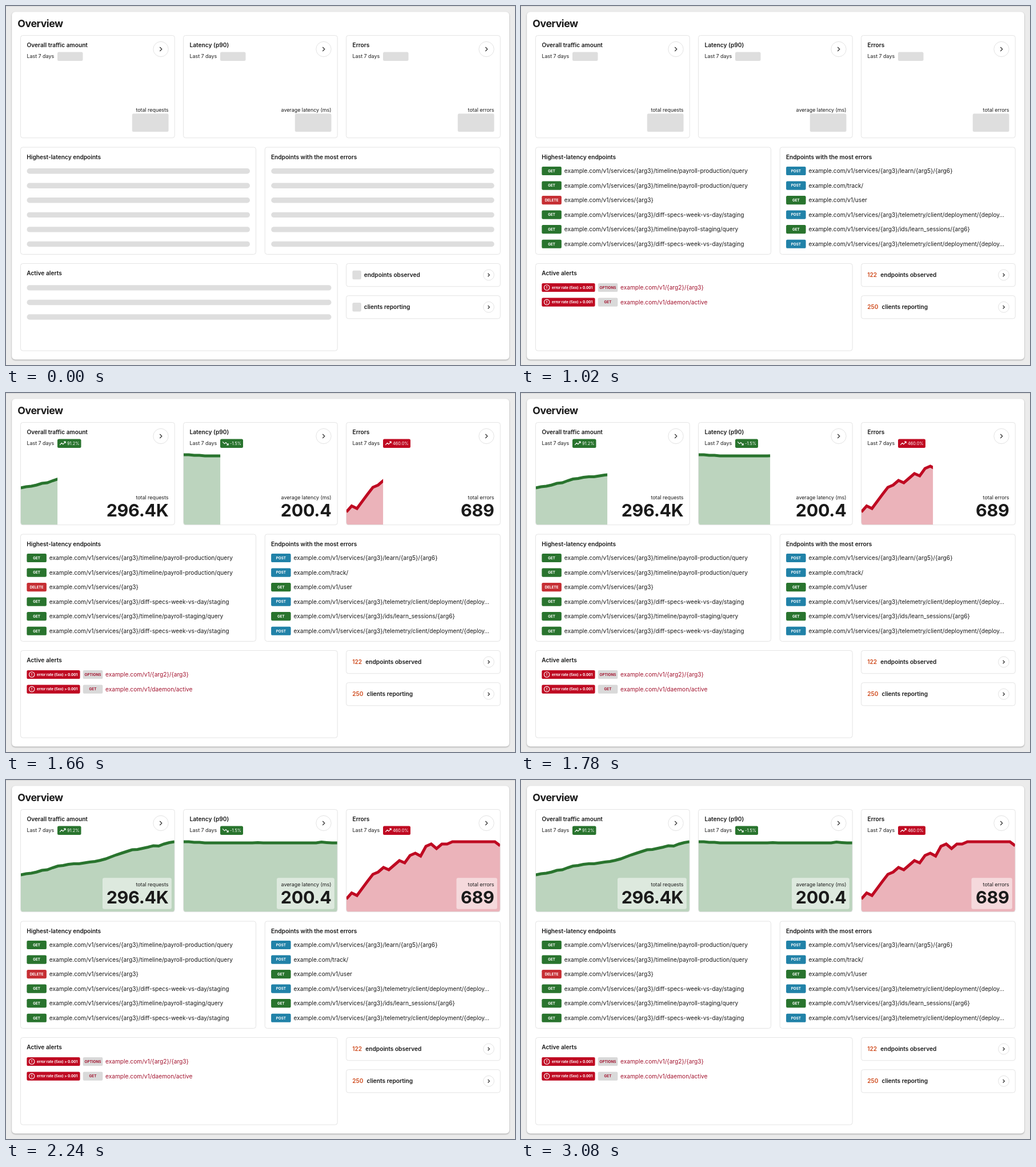
Write an HTML page that moves like this. It is 891 px wide and 628 px high and loops after 3.1 s.

```html
<!DOCTYPE html>
<html lang="en">
<head>
<meta charset="utf-8">
<title>Overview</title>
<style>
  html, body { margin: 0; width: 100%; height: 100%; overflow: hidden; background: #ebebeb; }
  svg { display: block; width: 891px; height: 628px; font-family: Inter, sans-serif; }
  text { fill: #1a1a1a; }
  .h1 { font-size: 17.78px; font-weight: 700; letter-spacing: -.025em; }
  .title { font-size: 10.16px; font-weight: 600; }
  .body { font-size: 10.16px; }
  .small { font-size: 8.89px; }
  .big { font-size: 30.5px; font-weight: 700; letter-spacing: -.01em; }
  .tag { font-size: 6.35px; font-weight: 700; }
  .pill { font-size: 7.3px; }
</style>
</head>
<body>
<svg id="stage" viewBox="0 0 891 628"></svg>
<script>
const LOOP = 3100;
const AT = { alerts: 240, tables: 800, totals: 1380, line: 3000 };
const SWEEP = { start: 1405, length: 786, width: 269.5 };
const GREEN = '#29742e', RED = '#bf0a22', BLUE = '#2182a8', ORANGE = '#cf4a1c';
const BONE = '#dedede', LINK = '#a3142f';
const METHOD = { GET: GREEN, POST: BLUE, DELETE: '#c62f34' };

const stage = document.getElementById('stage');
const timed = [], sweeps = [];

function add(parent, name, attrs, text) {
  const el = document.createElementNS('http://www.w3.org/2000/svg', name);
  for (const key in attrs) el.setAttribute(key, attrs[key]);
  if (text) el.textContent = text;
  return parent.appendChild(el);
}

function group(from, to) {
  const el = add(stage, 'g', {});
  timed.push({ el, from, to });
  return el;
}

const box = (g, x, y, width, height, rx, fill, more) =>
  add(g, 'rect', { x, y, width, height, rx, fill, ...more });
const label = (g, cls, x, y, text, more) => add(g, 'text', { class: cls, x, y, ...more }, text);
const stroke = (g, d, color, width) =>
  add(g, 'path', { d, fill: 'none', stroke: color, 'stroke-width': width });
const frame = (x, y, w, h) =>
  box(stage, x, y, w, h, 4, 'none', { stroke: '#e4e4e4', 'stroke-width': 1 });

function chevron(x, y, r) {
  const s = r > 10 ? 3.5 : 2.8;
  add(stage, 'circle', { cx: x, cy: y, r, fill: '#fff', stroke: '#dfdfdf', 'stroke-width': .9 });
  stroke(stage, `M${x - s / 2} ${y - s}l${s} ${s}l${-s} ${s}`, '#333', 1.25);
}

function tag(g, x, y, text, fill, color = '#fff') {
  box(g, x, y - 7.6, 34.5, 15.2, 2.2, fill);
  label(g, 'tag', x + 17.25, y + 2.3, text, { 'text-anchor': 'middle', style: `fill:${color}` });
}

// Panel
box(stage, 0, 0, 891, 628, 0, '#ebebeb');
box(group(0, AT.line), 0, 0, 891, 1, 0, '#d6d6d6');
box(stage, 10.2, 10.2, 870.8, 608.3, 6, '#fff', { style: 'filter:drop-shadow(0 1px 1px rgba(0,0,0,.32))' });
label(stage, 'h1', 20.3, 37, 'Overview');

const skeleton = group(0, AT.totals);
const totals = group(AT.totals, LOOP);

// Summary cards
const rise = 'M0 6.5l3.3-3.5l2.3 2.3l4.2-4.3M6.9 .8h3v3';
const fall = 'M0 1l3.3 3.5l2.3-2.3l4.2 4.3M6.9 6.7h3v-3';
const flat = Array(30).fill(110);
[108, 108, 109, 109].forEach((y, i) => flat[i] = y);
flat[14] = 109.5;
flat[26] = 108.6;
flat[27] = 109.4;

const cards = [
  { x: 25.5, title: 'Overall traffic amount', unit: 'total requests', total: '296.4K', boxX: 169,
    change: '91.2%', pillW: 41.5, icon: rise, color: GREEN,
    ys: [166, 164, 163, 161, 158, 157, 153.5, 150.5, 149.5, 147.5, 146.5, 146.5, 145, 143.5, 142.5,
      140.5, 138, 134.5, 131, 128, 125, 122, 121.5, 119.5, 117.5, 115, 115.5, 112, 109.5, 108] },
  { x: 310.5, title: 'Latency (p90)', unit: 'average latency (ms)', total: '200.4', boxX: 474,
    change: '-1.5%', pillW: 40, icon: fall, color: GREEN, ys: flat },
  { x: 595.5, title: 'Errors', unit: 'total errors', total: '689', boxX: 788.5,
    change: '460.0%', pillW: 48, icon: rise, color: RED,
    ys: [208, 197.5, 202, 189.5, 177, 165, 161, 153, 157, 149, 141, 145, 132, 128, 133,
      116, 112, 120, 112, 112, ...Array(9).fill(108), 115] }
];

const defs = add(stage, 'defs', {});

function chart(card, i) {
  const clip = add(defs, 'clipPath', { id: 'sweep' + i });
  sweeps.push(box(clip, card.x, 90, 0, 150, 0, '#000'));
  const round = add(defs, 'clipPath', { id: 'card' + i });
  box(round, card.x, 51.5, 269.7, 179.2, 4, '#000');

  const outer = add(totals, 'g', { 'clip-path': `url(#card${i})` });
  const g = add(outer, 'g', { 'clip-path': `url(#sweep${i})` });
  const pts = card.ys.map((y, n) => `${(card.x + .3 + n * 9.285).toFixed(2)} ${y}`).join('L');
  add(g, 'path', { d: `M${pts}V231H${card.x}Z`, fill: card.color, 'fill-opacity': .31 });
  stroke(g, 'M' + pts, card.color, 5);
}

cards.forEach((card, i) => {
  const { x } = card, left = x + 11, right = x + 259;
  const end = { 'text-anchor': 'end' };
  chart(card, i);
  frame(x, 51.5, 269.7, 179.2);
  label(stage, 'title', left, 72.4, card.title);
  label(stage, 'small', left, 91.4, 'Last 7 days');
  chevron(x + 245.5, 75.5, 13.2);

  box(skeleton, x + 64.5, 80.5, 44.5, 15.4, 2.5, BONE);
  box(skeleton, x + 195.3, 188.3, 63.7, 31.8, 2.5, BONE);
  label(skeleton, 'small', right, 185, card.unit, end);

  box(totals, x + 64.5, 80.5, card.pillW, 15.4, 2.5, card.color);
  stroke(add(totals, 'g', { transform: `translate(${x + 68.7} 84.3)` }), card.icon, '#fff', 1.1);
  label(totals, 'pill', x + 81.6, 90.9, card.change, { style: 'fill:#fff' });
  box(totals, card.boxX, 171.3, x + 264.3 - card.boxX, 54.5, 3, '#fff', { 'fill-opacity': .5 });
  label(totals, 'small', right, 186.3, card.unit, end);
  label(totals, 'big', right, 216.3, card.total, end);
});

// Endpoint tables
const svc = 'services/{arg3}';
const tables = [
  { x: 25.5, title: 'Highest-latency endpoints', rows: [
    ['GET', `v1/${svc}/timeline/payroll-production/query`],
    ['GET', `v1/${svc}/timeline/payroll-production/query`],
    ['DELETE', `v1/${svc}`],
    ['GET', `v1/${svc}/diff-specs-week-vs-day/staging`],
    ['GET', `v1/${svc}/timeline/payroll-staging/query`],
    ['GET', `v1/${svc}/diff-specs-week-vs-day/staging`]] },
  { x: 453.2, title: 'Endpoints with the most errors', rows: [
    ['POST', `v1/${svc}/learn/{arg5}/{arg6}`],
    ['POST', 'track/'],
    ['GET', 'v1/user'],
    ['POST', `v1/${svc}/telemetry/client/deployment/{deploy…`],
    ['GET', `v1/${svc}/ids/learn_sessions/{arg6}`],
    ['POST', `v1/${svc}/telemetry/client/deployment/{deploy…`]] }
];
const bones = group(0, AT.tables);
const filled = group(AT.tables, LOOP);

for (const { x, title, rows } of tables) {
  frame(x, 247, 412, 187.4);
  label(stage, 'title', x + 10.7, 267.5, title);
  rows.forEach(([method, path], i) => {
    const y = 288.5 + i * 25.55;
    box(bones, x + 11, y - 4.5, 390.5, 9.4, 4.7, BONE);
    tag(filled, x + 10.9, y, method, METHOD[method]);
    label(filled, 'body', x + 50.3, y + 3.6, 'example.com/' + path);
  });
}

// Alerts
frame(25.5, 450.5, 554.7, 152.6);
label(stage, 'title', 36.2, 471.4, 'Active alerts');
const waiting = group(0, AT.alerts);
const alerts = group(AT.alerts, LOOP);
for (let i = 0; i < 3; i++) box(waiting, 36.5, 488.2 + i * 25.55, 533, 9.4, 4.7, BONE);

[['OPTIONS', 'v1/{arg2}/{arg3}'], ['GET', 'v1/daemon/active']].forEach(([method, path], i) => {
  const y = 492.5 + i * 25.55;
  box(alerts, 36.4, y - 7.6, 93.2, 15.2, 2.2, RED);
  add(alerts, 'circle', { cx: 45.2, cy: y, r: 4.7, fill: 'none', stroke: '#fff', 'stroke-width': 1.1 });
  stroke(alerts, `M45.2 ${y - 2.6}v3.1m0 1v1.1`, '#fff', 1.1);
  label(alerts, 'tag', 54, y + 2.3, 'error rate (5xx) > 0.001', { style: 'fill:#fff' });
  tag(alerts, 134.8, y, method, '#d9d9d9', LINK);
  label(alerts, 'body', 174, y + 3.6, 'example.com/' + path, { style: `fill:${LINK}` });
});

// Counters
function counter(y, count, text, textX, at) {
  const before = group(0, at), after = group(at, LOOP);
  frame(595.5, y - 20, 269.7, 40.2);
  chevron(845, y, 9.4);
  box(before, 606.4, y - 7.7, 15.4, 15.4, 2.5, BONE);
  label(before, 'title', 626.8, y + 3.7, text);
  label(after, 'title', 606.2, y + 3.7, count, { style: `fill:${ORANGE}` });
  label(after, 'title', textX, y + 3.7, text);
}
counter(470.5, '122', 'endpoints observed', 629.3, AT.alerts);
counter(526.7, '250', 'clients reporting', 631.6, AT.tables);

function draw(t) {
  for (const { el, from, to } of timed) {
    el.setAttribute('visibility', t >= from && t < to ? 'visible' : 'hidden');
  }
  const p = Math.min(1, Math.max(0, (t - SWEEP.start) / SWEEP.length));
  const width = SWEEP.width * (1 - Math.cos(Math.PI * p)) / 2;
  for (const rect of sweeps) rect.setAttribute('width', width);
}

const start = performance.now();
function tick() {
  draw((performance.now() - start) % LOOP);
  requestAnimationFrame(tick);
}
tick();
</script>
</body>
</html>
```
